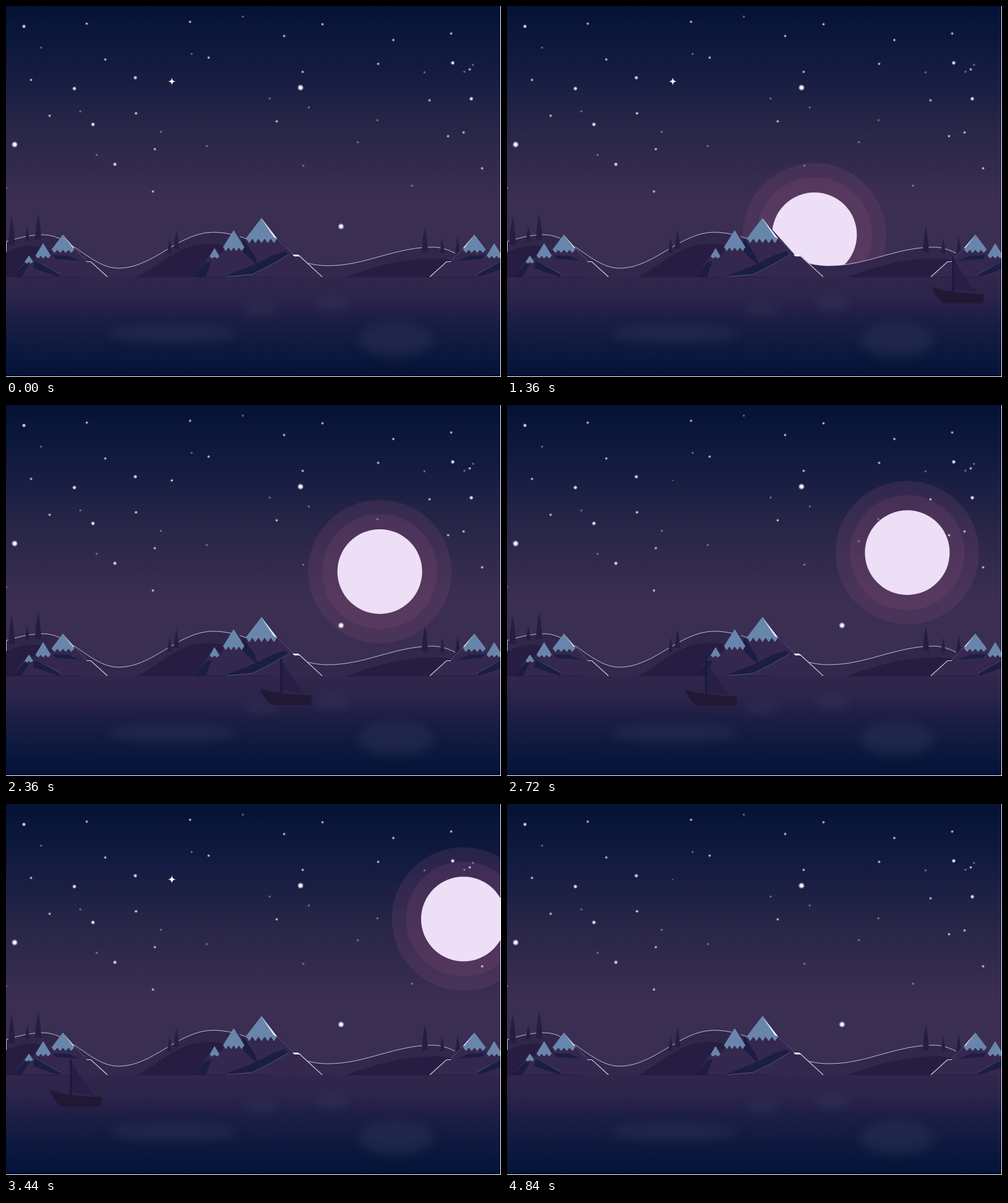
An HTML page for the animation above (4.96 s loop, 800 px wide and 600 px high).

```html
<!DOCTYPE html>
<html lang="en">
<head>
<meta charset="utf-8">
<title>Moonrise</title>
<style>
  html, body { margin: 0; width: 100%; height: 100%; overflow: hidden; background: #fff; }
  svg { display: block; width: calc(100vw - 1px); height: calc(100vh - 1px); }
  .rock { fill: #34284f; }
  .ravine { fill: #1b1d43; }
  .snow { fill: #6886ac; stroke: #93a9c6; stroke-width: .4; }
  .shine { fill: #f2eefa; }
  .edge { fill: none; stroke: #d8d1e6; stroke-width: 1.1; }
  .faint { fill: none; stroke: #7088ad; stroke-width: .7; opacity: .7; }
  .wood { fill: #271d42; }
</style>
</head>
<body>
<svg viewBox="0 0 799 599" preserveAspectRatio="none">
  <defs>
    <linearGradient id="sky" gradientUnits="userSpaceOnUse" x1="0" y1="0" x2="0" y2="440">
      <stop offset="0" stop-color="#041235"/>
      <stop offset=".2" stop-color="#111a40"/>
      <stop offset=".45" stop-color="#282648"/>
      <stop offset=".7" stop-color="#3a2e52"/>
      <stop offset="1" stop-color="#3b2e53"/>
    </linearGradient>
    <linearGradient id="sea" x1="0" y1="0" x2="0" y2="1">
      <stop offset="0" stop-color="#31264c"/>
      <stop offset=".2" stop-color="#2c244a"/>
      <stop offset=".42" stop-color="#1c1e45"/>
      <stop offset=".7" stop-color="#0e193f"/>
      <stop offset="1" stop-color="#041338"/>
    </linearGradient>
    <linearGradient id="land" gradientUnits="userSpaceOnUse" x1="0" y1="366" x2="0" y2="440">
      <stop offset="0" stop-color="#30264a"/>
      <stop offset="1" stop-color="#33284d"/>
    </linearGradient>
    <radialGradient id="glow">
      <stop offset=".3" stop-color="#fff"/>
      <stop offset=".6" stop-color="#f6eefb" stop-opacity=".7"/>
      <stop offset="1" stop-color="#d9c9ea" stop-opacity="0"/>
    </radialGradient>
    <filter id="blur" x="-30%" y="-60%" width="160%" height="220%"><feGaussianBlur stdDeviation="8"/></filter>

    <g id="sidePeaks">
      <path class="rock" d="M10 438L37 404 44 409 60 384 73 401 92 370 131 413H137L164 438Z"/>
      <path class="ravine" d="M10 438L30 417 37 418 25 438ZM47 409L88 434 85 438 44 424ZM75 403L101 404 119 412 95 410 80 409Z"/>
      <g id="sideSnow"></g>
      <path class="shine" d="M92 370L111 392 108 391Z"/>
      <path class="faint" d="M111 392L131 413M47 411L88 434"/>
      <path class="edge" d="M130 413.5H137L164 438"/>
    </g>
  </defs>

  <rect width="800" height="600" fill="url(#sky)"/>
  <g class="moon" fill="#8a4c78" fill-opacity=".2">
    <circle r="116"/>
    <circle r="93"/>
  </g>
  <g id="stars" fill="url(#glow)"></g>
  <path id="twinkle" fill="#fff" d="M0-1Q.04-.04 1 0 .04.04 0 1-.04.04-1 0-.04-.04 0-1Z"/>
  <circle class="moon" r="68.5" fill="#eddff6"/>

  <path id="ridge" fill="url(#land)" stroke="#d8d1e6" stroke-width=".9"/>
  <path class="wood" d="M0 440V398C25 387 42 385 62 390L125 440ZM208 440C250 420 275 386 325 385C365 384 390 400 430 440ZM545 440C600 420 640 408 700 408L760 416V440Z"/>
  <g id="trees" class="wood"></g>

  <use href="#sidePeaks"/>
  <use href="#sidePeaks" transform="matrix(-1 0 0 1 849 0)"/>
  <g>
    <path class="rock" d="M305 438L337 392 347 403 368 363 388 383 412 343 465 402 474 403 512 438Z"/>
    <path class="ravine" d="M305 438L323 415 332 413 323 438ZM383 376L402 404 407 420 386 401 380 392ZM352 438L402 418 432 403 451 397 457 402 426 420 398 434Z"/>
    <g id="mainSnow"></g>
    <path class="shine" d="M412 343L438 376 433 374Z"/>
    <path class="faint" d="M438 376L465 402M355 438L398 434 426 420 457 402"/>
    <path class="edge" d="M474 404L511 438"/>
    <path class="shine" d="M463 402H472L476 405H466Z"/>
  </g>

  <rect y="439" width="800" height="161" fill="url(#sea)"/>
  <g filter="url(#blur)" fill="#454468" opacity=".26">
    <ellipse cx="412" cy="490" rx="28" ry="9"/>
    <ellipse cx="526" cy="480" rx="28" ry="11"/>
    <ellipse cx="270" cy="530" rx="105" ry="14"/>
    <ellipse cx="630" cy="540" rx="60" ry="28"/>
  </g>
  <rect y="595" width="800" height="5" fill="#031034"/>

  <g id="boat">
    <path fill="#291e45" d="M2-44Q20-14 38 8L2 3Z"/>
    <rect x="-1.5" y="-49" width="3" height="56" fill="#131a40"/>
    <path fill="#211833" d="M-34 0L-14 5Q18 10 49 11Q51 18 47 26H-12Q-24 24-34 0Z"/>
  </g>
</svg>
<script>
const LOOP = 4960, STEP = 40, LAST = 4840;
const $ = id => document.getElementById(id);

function add(parent, tag, attrs) {
  const el = document.createElementNS('http://www.w3.org/2000/svg', tag);
  for (const k in attrs) el.setAttribute(k, attrs[k]);
  $(parent).append(el);
}

const star = (cx, cy, r, opacity) => add('stars', 'circle', { cx, cy, r, opacity });
const eachPoint = (list, fn) => list.split(' ').forEach(p => fn(...p.split(',').map(Number)));
const pair = (r, opacity) => (x, y) => {
  star(x, y, r, opacity);
  star(x + 30, y + 58, r, opacity);
};

eachPoint('476,132 14,224 541.5,356.5', (x, y) => star(x, y, 5.4, 1));
eachPoint('110.5,133.5 722,92', pair(3.6, .9));
eachPoint('29,33 209,116 176,256', (x, y) => star(x, y, 3.4, .85));
eachPoint('130.5,28.5 297.5,25.5 449.5,48.5 719.5,44.5 40.5,119.5 210.5,173.5 684.5,152.5 739.5,204.5', pair(2.6, .7));
eachPoint('511.5,29.5 626,55 601.5,93.5 437.5,186.5 237.5,300', (x, y) => star(x, y, 2.6, .7));

// Faint stars are scattered evenly over the sky.
let seed = 7;
const random = () => (seed = seed * 16807 % 2147483647) / 2147483647;
for (let i = 0; i < 18; i++) star((i + random()) * 44, random() * 320, 2.4, .36);

// The ridge runs through its highs and lows in cosine waves.
const turns = [[-60, 392], [60, 370], [182, 424], [335, 366], [520, 420], [690, 390], [800, 431]];
function ridge(x) {
  const i = turns.findIndex(p => p[0] > x), [x0, y0] = turns[i - 1], [x1, y1] = turns[i];
  return y0 + (y1 - y0) * (1 - Math.cos(Math.PI * (x - x0) / (x1 - x0))) / 2;
}
let line = 'M.5 442';
for (let x = .5; x < 799; x += 4) line += `L${x} ${ridge(x).toFixed(1)}`;
$('ridge').setAttribute('d', line + 'L801 442Z');

function tree(x, rise) {
  const base = ridge(x) + 8, top = base - rise - 8, w = 2 + rise / 12, mid = base - rise * .5;
  add('trees', 'path', { d: `M${x} ${top}Q${x + w} ${mid} ${x + w} ${base}H${x - w}Q${x - w} ${mid} ${x} ${top}Z` });
}
eachPoint('9,38 34.5,16 52,35 264.5,16 275.5,23 677,33 705,16 730,29', tree);

// Snow cap: a peak with a saw-toothed lower rim.
function cap(parent, x, y, w, h, teeth) {
  let d = `M${x} ${y}`;
  for (let i = 0; i <= teeth * 2; i++) d += `L${x - w + i * w / teeth} ${y + h * (i % 2 ? 1 : .82)}`;
  add(parent, 'path', { d: d + 'Z', class: 'snow' });
}
cap('sideSnow', 92, 370, 18, 29, 4);
cap('sideSnow', 60, 384, 12, 24, 3);
cap('sideSnow', 37, 404, 6.5, 12, 2);
cap('mainSnow', 413, 343, 25, 40, 5);
cap('mainSnow', 368, 363, 17, 33, 4);
cap('mainSnow', 337, 392, 7.5, 16, 2);

// The boat gathers speed up to mid-stage, then slows gently.
function boatX(s) {
  const mid = 2.4, u = s - mid;
  return u < 0 ? 838 - 408 * (s / mid) ** 2.2 : 430 - u * (349 - 35 * u);
}

const place = (el, x, y, k = 1) => el.setAttribute('transform', `translate(${x} ${y}) scale(${k})`);
const moons = document.querySelectorAll('.moon');
function draw(s) {
  const u = s - 2;
  const x = 563.5 + u * (109.6 + 8.7 * u), y = 303 - u * (97.4 - 11.2 * u);
  moons.forEach(m => place(m, x, y));
  place($('boat'), boatX(s), 449.5 + s * 4);
  place($('twinkle'), 268, 122, 4.6 + 3.6 * Math.cos(2 * Math.PI * (s - 1.7) / 2.05));
}

const start = performance.now();
function tick() {
  const t = (performance.now() - start) % LOOP;
  draw(Math.min(Math.floor(t / STEP) * STEP, LAST) / 1000);
  requestAnimationFrame(tick);
}
tick();
</script>
</body>
</html>
```
